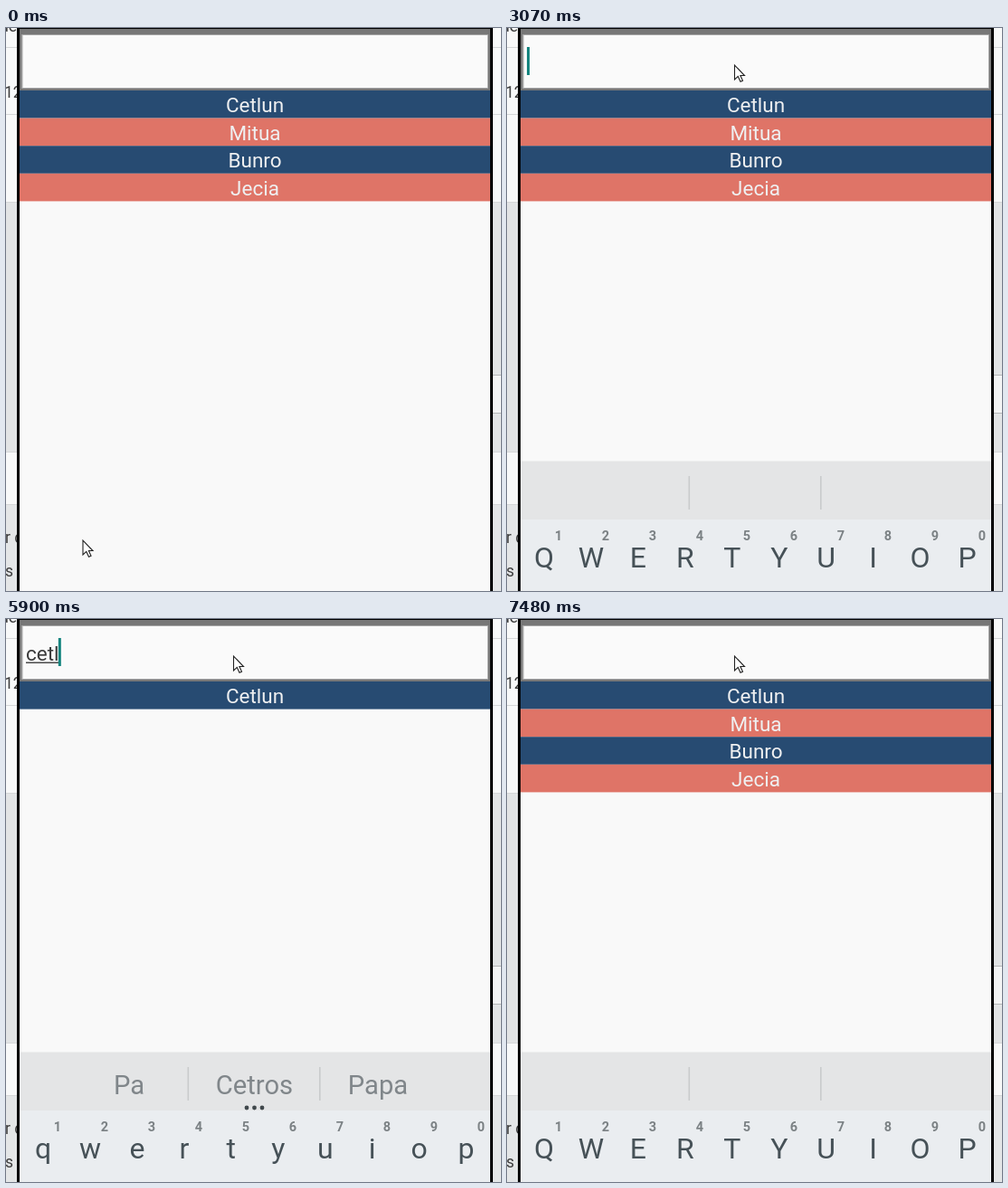
Write an HTML page that moves like this. It is 547 by 622 pixels and loops after 8000 ms.

```html
<!DOCTYPE html>
<html lang="es">
<head>
<meta charset="utf-8">
<style>
  html, body { margin: 0; width: 100%; height: 100%; overflow: hidden; background: #f9f9f9; }
  svg { display: block; width: 547px; height: 622px; font-family: Roboto, sans-serif; }
  .mid { text-anchor: middle; }
  .name { font-size: 22.5px; fill: #eff0f1; }
  .typed { font-size: 22.5px; fill: #3a3a3a; }
  .key { font-size: 32px; fill: #465157; }
  .digit { font-size: 14.5px; font-weight: 700; fill: #7b8184; }
  .hint { font-size: 29.2px; fill: #80868a; }
  .page { font: 17.5px Roboto, sans-serif; fill: #3c3c3c; }
</style>
</head>
<body>
<svg id="stage" viewBox="0 0 547 622"></svg>
<script>
const LOOP = 8000;
const NAMES = ['Cetlun', 'Mitua', 'Bunro', 'Jecia'];
const HINTS = [['Pa', 136], ['Cetros', 274.5], ['Papa', 411]];
const ROW = 30.6;

// Tracks: [start time, value...]; each value holds until the next entry.
const POINTER = [
  [0, 85, 566], [120, 78, 569], [270, 72, 572],
  [550, 60, 577], [690, 72, 577], [830, 85, 571], [970, 117, 521],
  [1120, 297, 461], [1260, 297, 420], [1400, 290, 380], [1540, 278, 354],
  [1700, 238.5, 321], [1850, 243, 260], [1990, 253, 195], [2130, 253, 100], [2280, 251.5, 41]
];
const TYPED = [
  [0, ''], [4070, 'c'], [4340, 'ce'], [4610, 'cet'], [4760, 'cetl'], [5040, 'cetlu'],
  [5900, 'cetl'], [6180, 'cet'], [6460, 'ce'], [6610, 'c'], [6900, '']
];
const QUERY = [[0, ''], [4070, 'c'], [4340, 'ce'], [6760, 'c'], [6900, '']];
const CARET = [[0, 0], [2510, 1], [2790, 0], [3070, 1], [3500, 0], [3930, 1], [5600, 0], [5900, 1], [7480, 0]];
const BOARD = [[0, 144], [2790, 90], [2930, 24], [3070, 0]];
const HINT_COUNT = [[0, 0], [4760, 2], [4900, 3], [6900, 0]];

const at = (track, t) => track.findLast(entry => entry[0] <= t).slice(1);

const stage = document.getElementById('stage');
function add(tag, attrs, parent = stage, text = '') {
  const el = document.createElementNS('http://www.w3.org/2000/svg', tag);
  for (const k in attrs) el.setAttribute(k, attrs[k]);
  el.textContent = text;
  parent.append(el);
  return el;
}
const rect = (x, y, width, height, fill, parent) => add('rect', { x, y, width, height, fill }, parent);
const label = (x, y, cls, text, parent) => add('text', { x, y, class: cls }, parent, text);

// Page behind the phone
rect(0, 0, 547, 622, '#f8f9f9');
rect(0, 193, 547, 275, '#e2e4e5');
rect(0, 527, 547, 95, '#e4e6e7');
rect(538, 384, 9, 41, '#f4f5f5');
for (const y of [21, 95, 192, 468, 526]) rect(0, y, 547, 1, '#d5d7d8');
for (const y of [383, 425]) rect(538, y, 9, 1, '#b4b6b7');
label(-7, 4, 'page', 'de');
label(-2, 77, 'page', '12');
label(-1, 569, 'page', 'r c');
label(-1, 606, 'page', 's');

// Phone
rect(12, 0, 526, 622, '#000');
rect(15, 1, 520, 621, '#f9f9f9');
rect(15, 1, 520, 68, '#777');
rect(17, 7, 516, 60, '#a5a5a5');
rect(18.5, 8, 513.5, 58, '#fafafa');

const rows = NAMES.map((_, i) => {
  const g = add('g', { transform: `translate(0 ${69 + ROW * i})` });
  rect(15, 0, 520, ROW, i % 2 ? '#df7467' : '#274b72', g);
  return { g, text: label(275, 24, 'name mid', '', g) };
});

const typed = label(22, 46, 'typed', '');
const underline = rect(22, 47.5, 0, 1.5, '#4a4a4a');
const caret = rect(22, 21, 3, 31, '#16857f');

// Keyboard
const board = add('g', {});
rect(15, 478.5, 520, 65, '#e4e5e6', board);
rect(15, 543, 520, 79, '#eaedf0', board);
for (const x of [200.5, 346]) rect(x, 495, 1.6, 37, '#c9cbcc', board);
const keys = [...'QWERTYUIOP'].map((letter, i) => {
  label(57 + 52 * i, 566, 'digit mid', (i + 1) % 10, board);
  return { letter, el: label(41 + 51.95 * i, 596, 'key mid', letter, board) };
});
const hints = HINTS.map(([word, x]) => label(x, 525, 'hint mid', word, board));
const dots = add('g', { fill: '#40484c' }, board);
for (const cx of [266, 274.5, 283]) add('circle', { cx, cy: 540, r: 2.4 }, dots);
const clip = add('clipPath', { id: 'phone' });
rect(15, 0, 520, 622, '#000', clip);

const pointer = add('path', {
  d: 'M0 0V16L3.8 12.4L6.5 18.3L9 17.2L6.4 11.5H11Z',
  fill: '#fff', stroke: '#222', 'stroke-width': 1.1
});

const show = (el, on) => el.setAttribute('visibility', on ? 'visible' : 'hidden');

function draw(t) {
  const [word] = at(TYPED, t), [query] = at(QUERY, t);
  const [count] = at(HINT_COUNT, t), [drop] = at(BOARD, t);

  const found = NAMES.filter(name => name.toLowerCase().includes(query));
  rows.forEach(({ g, text }, i) => {
    show(g, i < found.length);
    text.textContent = found[i] || '';
  });

  typed.textContent = word;
  const width = word ? typed.getComputedTextLength() : 0;
  underline.setAttribute('width', t < 4340 ? 0 : width);
  caret.setAttribute('x', 22 + Math.max(0, width - 0.7));
  show(caret, at(CARET, t)[0]);

  board.setAttribute('transform', `translate(0 ${drop})`);
  for (const { letter, el } of keys) el.textContent = word ? letter.toLowerCase() : letter;
  hints.forEach((el, i) => show(el, i < count));
  show(dots, count > 2);

  pointer.setAttribute('transform', `translate(${at(POINTER, t).join(' ')})`);
}

const start = performance.now();
function tick() {
  draw((performance.now() - start) % LOOP);
  requestAnimationFrame(tick);
}
tick();
</script>
</body>
</html>
```
